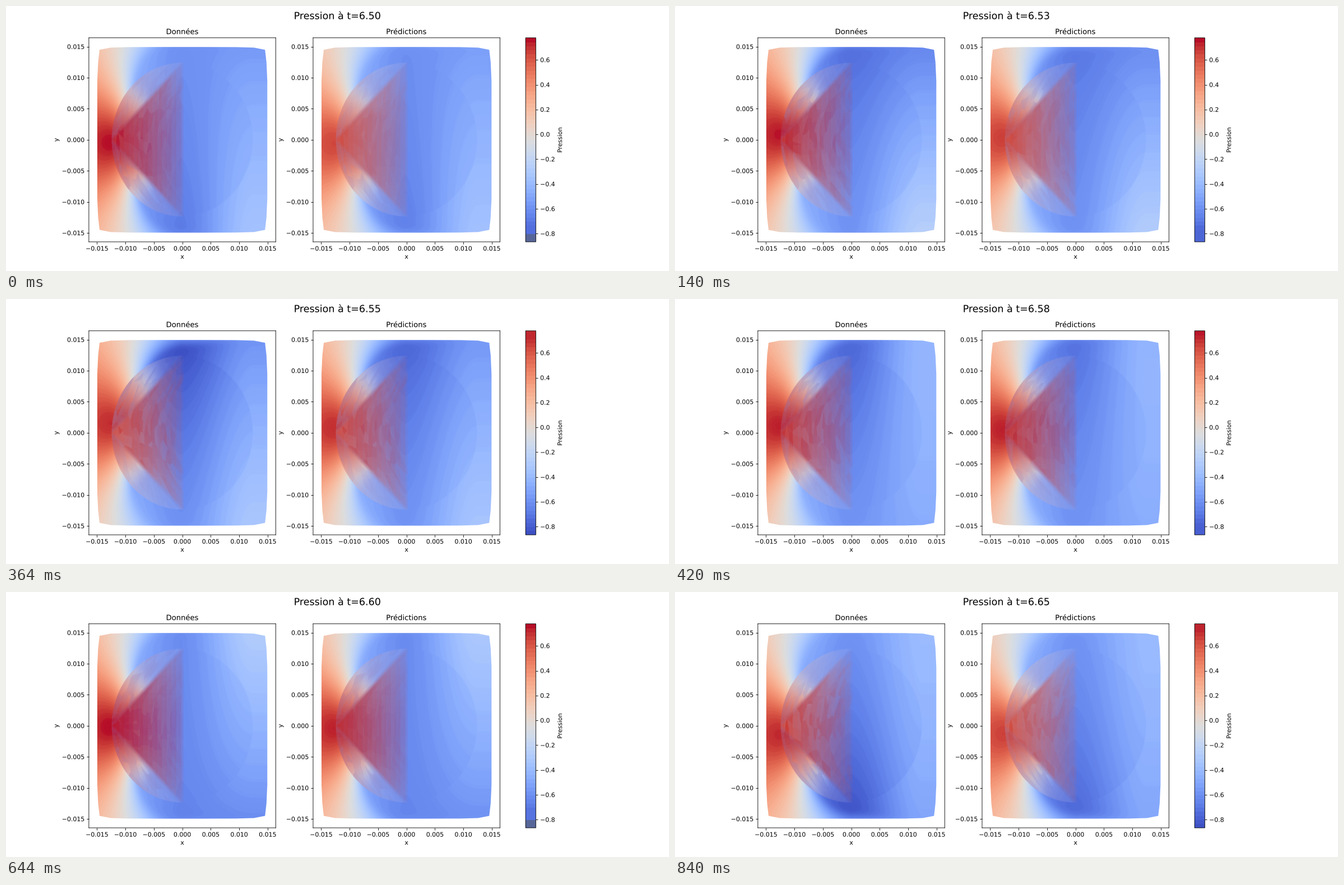
These frames come from a looping animation (1183x473 px, 0.98 s). A matplotlib script:

```python
import numpy as np
import matplotlib.pyplot as plt
from matplotlib.animation import FuncAnimation
from matplotlib.cm import ScalarMappable
from matplotlib.colors import ListedColormap, Normalize
from matplotlib.patches import Polygon
from matplotlib.patheffects import Normal

# unsnapped lines and text drawn as outlines, for sub-pixel placing
plt.rcParams["path.snap"] = False
plt.rcParams["path.effects"] = [Normal()]

DPI = 78.86
W, H = 1183.001, 473.001
FRAMES = 7
LEVELS = 50
VMIN, VMAX = -0.866, 0.778
R = 1.24          # cylinder radius, in hundredths
UNIT = 0.01
CELLS = 150
CMAP = plt.get_cmap("coolwarm")

EDGE = 1.52
X, Y = np.meshgrid(np.linspace(-EDGE, EDGE, 616), np.linspace(-EDGE, EDGE, 674))
INSIDE = np.hypot(X, Y) < R
FRONT = INSIDE & (X < .02)
FX, FY = X[FRONT], Y[FRONT]


def wave(i, lag):
    return np.cos(2 * np.pi * (i - lag) / FRAMES)


def shedding(i, predicted):
    """Flow state of one panel: tilt, peak, swing and the two wake columns."""
    gain = .7 if predicted else 1
    a = gain * wave(i, 2.1)
    b = (.88 if predicted else 1) * wave(i, 1.1)
    peak = .955 + .03 * wave(i, 3.4) if predicted else 1 - .035 * a * a
    mean = .145 - .06 * a * a
    centre = mean + .075 * np.array([-a, 0, a])
    centre[1] = .15 - .05 * a * a
    right = .255 + .11 * np.array([-b, .1, b])
    tilt = .15 * a - (.03 if predicted else 0)
    return tilt, peak, abs(a), centre, right


def smooth(u):
    u = np.clip(u, 0, 1)
    return u * u * (3 - 2 * u)


def facets():
    """Cell index of a stretched, curved Voronoi mesh on the front half."""
    rng = np.random.default_rng(4)
    ang = rng.uniform(-1.57, 1.57, CELLS)
    rad = R * np.sqrt(rng.uniform(0, 1, CELLS))
    sx, sy = -rad * np.cos(ang), rad * np.sin(ang)
    bend = lambda x, y: 3 * (x - .38 * y * y)
    u = bend(FX, FY)
    best = np.full(u.shape, 1e9)
    cell = np.zeros(u.shape, int)
    for k, (a, b) in enumerate(zip(bend(sx, sy), sy)):
        d = (u - a) ** 2 + (FY - b) ** 2
        near = d < best
        best[near] = d[near]
        cell[near] = k
    return cell


CELL = facets()


def column(y, values, ref):
    """Parabola through top, middle and bottom values."""
    top, mid, bot = values
    e = np.clip(y / ref, -1.1, 1.1)
    return mid + (top - bot) / 2 * e + ((top + bot) / 2 - mid) * e * e


def front_pressure(theta, rad, peak):
    """Potential flow around a cylinder, scaled to 0..1."""
    q = (1.27 / rad) ** 2
    cp = 2 * q * np.cos(2 * theta) - q * q
    t = (.265 + .505 * cp - VMIN) / (VMAX - VMIN)
    return .5 + (t - .5) * (2 * peak - 1)


def soft_max(a, b, w=.04):
    return w * np.logaddexp(a / w, b / w)


def colour(t):
    """Colour map with half-strength contour bands."""
    t = np.clip(t, 0, .9999)
    band = (np.floor(t * LEVELS) + .5) / LEVELS
    return CMAP((t + band) / 2)[..., :3]


def render(i, predicted):
    tilt, peak, swing, centre, right = shedding(i, predicted)
    turn = tilt / R

    # wake: centre line blended into the right side, damped behind the body
    s = smooth((X + .05) / 1.3) * np.where(INSIDE, .85, 1)
    wake = (1 - s) * column(Y, centre, 1.3) + s * column(Y, right, 1.4)
    wake += .09 * smooth(-X)
    xf = np.minimum(X, 0)
    rad = np.maximum(np.hypot(xf, Y), R)
    front = front_pressure(np.arctan2(Y, -xf) - turn, rad, peak)
    img = colour(soft_max(front, wake))

    # overlapping translucent facets on the front half
    noise = np.random.default_rng(20 + i).uniform(-1, 1, CELLS)[CELL]
    amp = .2 + .8 * swing
    dy2 = (FY - tilt) ** 2
    lens = np.clip((np.abs(FY) - 1.2 - FX) / .1, 0, 1)
    depth = np.clip((.02 - FX) / 1.25, 0, 1)
    depth = np.floor(depth * 15 + .5) / 15
    mix = (.1 + .88 * depth ** .8) * (1 - .12 * dy2) * (1 - .4 * lens)
    mix = np.clip(mix + .07 * amp * noise, .04, 1)[:, None]
    red = colour(peak - .05 * amp - .06 * dy2 + .02 * amp * noise)
    body = mix * red + (1 - mix) * colour(wake[FRONT])

    theta = .9 * (np.arctan2(FY, -FX) - turn)
    skin = colour(soft_max(front_pressure(theta, R, peak), wake[FRONT] + .05))
    lens = (lens * (.55 + .14 * noise))[:, None]
    img[FRONT] = lens * skin + (1 - lens) * body
    return img


def outline():
    """Rounded square, one quarter mirrored four ways."""
    quarter = [(1.495, .3), (1.495, .95), (1.48, 1.25), (1.455, 1.45),
               (1.26, 1.485), (.95, 1.493), (.33, 1.495)]
    pts = quarter + [(-x, y) for x, y in quarter[::-1]]
    pts += [(x, -y) for x, y in pts[::-1]]
    return np.array(pts) * UNIT


def bar_colours(i):
    """Bar colours, limited to the range the panels reach."""
    states = [shedding(i, p) for p in (False, True)]
    low = min(s[3].min() for s in states)
    high = max(s[1] for s in states)
    t = np.clip((np.arange(LEVELS) + .5) / LEVELS, low * .7, high)
    cols = CMAP(t)
    if low > .1:
        cols[:2] = (.34, .40, .60, 1)
    return ListedColormap(cols)


fig, axs = plt.subplots(1, 2, figsize=(W / DPI, H / DPI), dpi=DPI)
title = fig.suptitle("", fontsize=16)
ticks = np.arange(-3, 4) * .005
span, lim = EDGE * UNIT, .01643
images = []
for ax, name in zip(axs, ("Données", "Prédictions")):
    im = ax.imshow(np.ones((*X.shape, 3)), origin="lower", aspect="auto",
                   extent=(-span, span, -span, span))
    im.set_clip_path(Polygon(outline(), transform=ax.transData))
    images.append(im)
    ax.set(title=name, xlabel="x", ylabel="y", xticks=ticks, yticks=ticks,
           xlim=(-lim, lim), ylim=(-lim, lim))
    ax.xaxis.set_major_formatter("{x:.3f}")
    ax.yaxis.set_major_formatter("{x:.3f}")

scale = ScalarMappable(Normalize(VMIN, VMAX), bar_colours(0))
fig.colorbar(scale, ax=list(axs), label="Pression",
             ticks=np.arange(-4, 4) * .2)


def update(i):
    title.set_text(f"Pression à t={6.5 + .025 * i + 1e-6:.2f}")
    for im, predicted in zip(images, (False, True)):
        im.set_data(render(i, predicted))
    scale.set_cmap(bar_colours(i))
    return images


anim = FuncAnimation(fig, update, frames=FRAMES, interval=140, repeat=True,
                     repeat_delay=0, blit=False)
plt.show()
```
